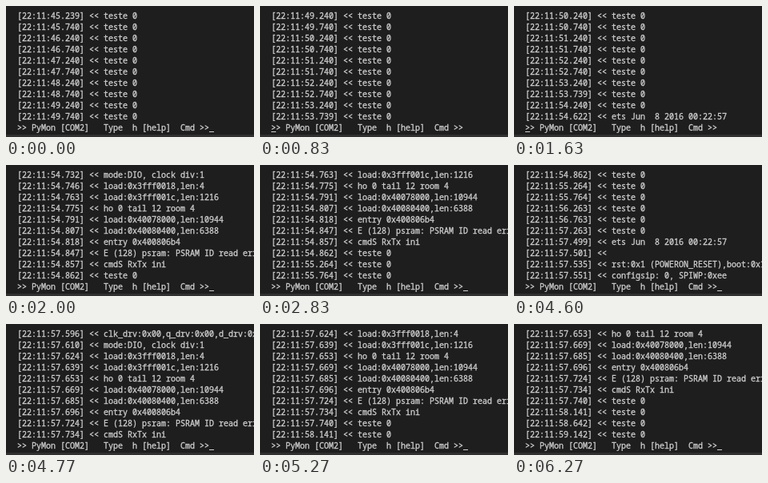
These frames come from a looping animation (310x164 px, 6.43 s). An HTML page:

```html
<!DOCTYPE html>
<html lang="en">
<head>
<meta charset="utf-8">
<title>Serial monitor</title>
<style>
  html, body { margin: 0; width: 100%; height: 100%; overflow: hidden; background: #1e1e1e; }
  #screen {
    position: relative; width: 100%; height: 100%; overflow: hidden; contain: strict;
    color: #d0d0d0; font: 10px/14px "Noto Sans Mono", "DejaVu Sans Mono", monospace;
  }
  pre {
    position: absolute; left: 14px; right: 0; height: 14px; margin: 0; overflow: hidden;
    font: inherit; -webkit-text-stroke: .3px;
  }
  #cursor { position: absolute; top: 157px; width: 6px; height: 1px; background: #d0d0d0; }
  #edge { position: absolute; top: 161px; bottom: 0; width: 100%; background: #303030; }
</style>
</head>
<body>
<div id="screen"><div id="cursor"></div><div id="edge"></div></div>
<script>
const LOOP = 6430, ROWS = 10, TICK = 34, LEFT = 14, CHAR = 6, LINE = 14;
const PROMPT = ">> PyMon [COM2]   Type  h [help]  Cmd >>";

// Boot messages with their delay in ms after the reset
const BOOT = [
  [0, "ets Jun  8 2016 00:22:57"],
  [2, ""],
  [36, "rst:0x1 (POWERON_RESET),boot:0x13 (SPI_FAST_FLASH_BOOT)"],
  [52, "configsip: 0, SPIWP:0xee"],
  [96, "clk_drv:0x00,q_drv:0x00,d_drv:0x00,cs0_drv:0x00,hd_drv:0x00,wp_drv:0x00"],
  [110, "mode:DIO, clock div:1"],
  [124, "load:0x3fff0018,len:4"],
  [141, "load:0x3fff001c,len:1216"],
  [153, "ho 0 tail 12 room 4"],
  [169, "load:0x40078000,len:10944"],
  [185, "load:0x40080400,len:6388"],
  [196, "entry 0x400806b4"],
  [225, "E (128) psram: PSRAM ID read error"],
  [235, "cmdS RxTx ini"],
  [240, "teste 0"],
];
// Stamps of the second reset differ slightly
const SECOND = [0, 2, 36, 52, 97, 111, 125, 140, 154, 170, 186, 197, 225, 235, 241];

const log = [];   // { at: time shown, text }
const moves = []; // times at which the cursor jumps to the line start

function add(at, stamp, text) {
  log.push({ at, text: `[22:11:${(stamp / 1000).toFixed(3)}] << ${text}` });
}
function ping(at, stamp, jump = true) {
  add(at, stamp, "teste 0");
  if (jump) moves.push(at + TICK);
}
function boot(at, stamp, delays) {
  BOOT.forEach(([, text], i) =>
    add(at + Math.ceil(delays[i] / TICK) * TICK, stamp + delays[i], text));
}

add(0, 45239, "teste 0");
for (let s = 45740; s < 50000; s += 500) add(0, s, "teste 0");
for (let s = 50240; s < 53000; s += 500) add(100, s, "teste 0");
ping(270, 53240, false);
ping(770, 53739);
ping(1270, 54240);
moves.push(1630);
boot(1630, 54622, BOOT.map(b => b[0]));
[55264, 55764, 56263, 56763, 57263].forEach((s, i) => ping(2300 + 500 * i, s));
boot(4530, 57499, SECOND);
[58141, 58642, 59142].forEach((s, i) => ping(5170 + 500 * i, s, i < 2));

const cursor = document.getElementById("cursor");
const rows = Array.from({ length: ROWS + 1 }, (_, i) => {
  const row = document.createElement("pre");
  row.style.top = 5 + LINE * i + "px";
  document.getElementById("screen").append(row);
  return row;
});
rows[ROWS].textContent = PROMPT;

function draw() {
  const t = performance.now() % LOOP;
  const shown = log.filter(l => l.at <= t).slice(-ROWS);
  shown.forEach((l, i) => rows[i].textContent = l.text);
  const home = moves.some(m => t >= m && t < m + TICK);
  cursor.style.left = LEFT + (home ? 0 : PROMPT.length * CHAR) + "px";
  requestAnimationFrame(draw);
}
draw();
</script>
</body>
</html>
```
